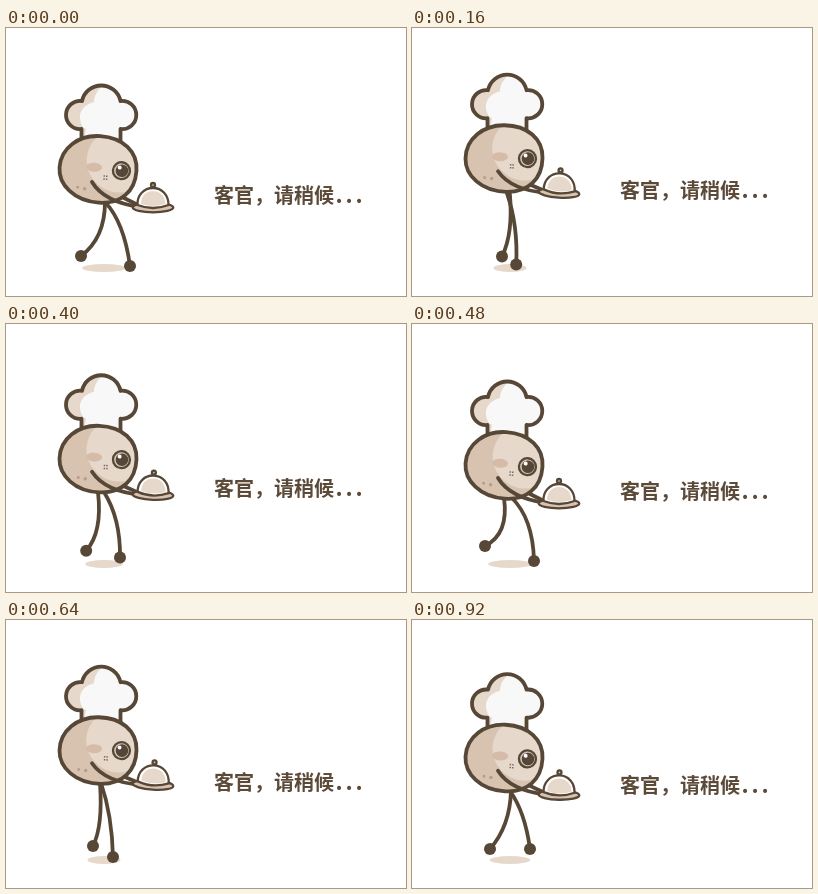
Write an HTML page without scripts that moves like this. It is 400x268 px and loops after 0.96 s.

```html
<!DOCTYPE html>
<html lang="zh-CN">
<head>
<meta charset="utf-8">
<title>请稍候</title>
<style>
  /* 0 = lowest point of the stride, 1 = highest */
  @property --lift { syntax: "<number>"; inherits: true; initial-value: 0; }

  html, body { margin: 0; width: 100%; height: 100%; overflow: hidden; background: #fff; }
  svg {
    --ink: #574737;
    display: block; width: 100vw; height: 100vh;
    animation: bob 480ms -2ms infinite;
  }
  .line { fill: none; stroke: var(--ink); stroke-width: 3.8; stroke-linecap: round; stroke-linejoin: round; }
  .thin { stroke: var(--ink); stroke-width: 2.3; }
  .ink { fill: var(--ink); }
  .tan { fill: #d8c2b0; }
  .sand { fill: #e6d9cb; }

  .hat, .label { transform: translateY(calc(var(--lift) * var(--rise))); }
  .hat { --rise: -14px; }
  .label { --rise: -6px; }
  .head {
    transform-origin: 91px 141px;
    transform: translateY(calc(var(--lift) * -14px)) rotate(calc((1 - var(--lift)) * 4deg));
  }
  .arm {
    transform-origin: 86px 154px;
    transform: translateY(calc(var(--lift) * -14px)) rotate(calc(var(--lift) * -5deg));
  }
  .tray {
    transform-origin: 147px 180px;
    transform: translateY(calc(var(--lift) * -19px)) rotate(calc(var(--lift) * 5deg));
  }
  .shadow { transform-origin: 98px 240px; transform: scaleX(calc(1 - var(--lift) * .32)); }
  .leg { marker-end: url(#foot); animation: 960ms -2ms infinite; }
  .near { animation-name: near; }
  .far { animation-name: far; }
  .label { font: 700 20px "Noto Sans CJK SC", "Noto Sans CJK", sans-serif; fill: #5c4a39; }
  .dots { font-size: 22px; letter-spacing: 2.8px; }

  /* Each step lasts 40 ms */
  @keyframes bob {
    0%       { --lift: 0;   animation-timing-function: steps(2); }
    16.6667% { --lift: .38; animation-timing-function: steps(2); }
    33.3333% { --lift: .77; animation-timing-function: steps(2); }
    50%      { --lift: 1;   animation-timing-function: steps(1); }
    58.3333% { --lift: 1;   animation-timing-function: steps(1); }
    66.6667% { --lift: .86; animation-timing-function: steps(3); }
    91.6667% { --lift: .24; animation-timing-function: steps(1); }
    100%     { --lift: 0; }
  }
  @keyframes near {
    0%       { d: path("M99 174Q118 194 124 238"); animation-timing-function: steps(2); }
    8.3333%  { d: path("M97 169Q113 193 113 238"); animation-timing-function: steps(5); }
    29.1667% { d: path("M92 160Q96 205 91 234");   animation-timing-function: steps(5); }
    50%      { d: path("M92 174Q97 210 73 222");   animation-timing-function: steps(4); }
    66.6667% { d: path("M94 163Q97 206 87 226");   animation-timing-function: steps(4); }
    83.3333% { d: path("M95 162Q104 192 104 229"); animation-timing-function: steps(3); }
    95.8333% { d: path("M98 171Q113 192 118 229"); animation-timing-function: steps(1); }
    100%     { d: path("M99 174Q118 194 124 238"); }
  }
  @keyframes far {
    0%       { d: path("M99 174Q99 210 75 228");   animation-timing-function: steps(2); }
    8.3333%  { d: path("M99 169Q99 212 82 229");   animation-timing-function: steps(5); }
    29.1667% { d: path("M96 160Q105 195 102 228"); animation-timing-function: steps(5); }
    50%      { d: path("M99 173Q121 194 122 237"); animation-timing-function: steps(4); }
    66.6667% { d: path("M95 163Q106 195 107 237"); animation-timing-function: steps(4); }
    83.3333% { d: path("M99 162Q98 205 90 232");   animation-timing-function: steps(3); }
    95.8333% { d: path("M99 171Q98 206 78 229");   animation-timing-function: steps(1); }
    100%     { d: path("M99 174Q99 210 75 228"); }
  }
</style>
</head>
<body>
<svg viewBox="0 0 400 268">
  <defs>
    <path id="hat" d="M75.500 114V101A14.100 14.100 0 1 1 76 73A19.700 19.700 0 0 1 114.500 73A14.100 14.100 0 1 1 114.500 101V114"/>
    <path id="head" d="M92 108C115 108 130.500 121 130.500 140C130.500 161 117 174.500 95 174.500C70 174.500 53.500 159 53.500 142C53.500 122 71 108 92 108Z"/>
    <clipPath id="hatClip"><use href="#hat"/></clipPath>
    <clipPath id="headClip"><use href="#head"/></clipPath>
    <marker id="foot" viewBox="-7 -7 14 14" markerWidth="14" markerHeight="14" markerUnits="userSpaceOnUse">
      <circle class="ink" r="6"/>
    </marker>
  </defs>

  <ellipse class="shadow sand" cx="98" cy="240" rx="22" ry="4"/>
  <path class="line leg far" d="M99 174Q99 210 75 228"/>
  <path class="line leg near" d="M99 174Q118 194 124 238"/>

  <g class="hat">
    <use href="#hat" class="sand"/>
    <path clip-path="url(#hatClip)" fill="#f8f8f9" d="M104 53C94 58 88 66 88 74C79 76 73 83 74 91Q75 99 80 101L77 116H135V53Z"/>
    <use href="#hat" class="line"/>
  </g>

  <path class="arm line" d="M112 167L130 176"/>

  <g class="head">
    <use href="#head" class="tan"/>
    <ellipse clip-path="url(#headClip)" class="sand" cx="113" cy="131" rx="33" ry="32"/>
    <use href="#head" class="line"/>
    <ellipse cx="88" cy="139.500" rx="8" ry="4.500" fill="#d5bba8"/>
    <g fill="#b89d8a">
      <circle cx="73" cy="160.500" r="1.500"/>
      <circle cx="80" cy="161.500" r="1.700"/>
    </g>
    <path d="M98 147.500h4M98 150.500h4" stroke="#806b5b" stroke-width="1.500" stroke-dasharray="1.500 1"/>
    <circle class="thin" cx="115.500" cy="141" r="8.500" fill="#d5c5b5"/>
    <circle cx="116" cy="141" r="6.300" fill="#55463a"/>
    <circle cx="113.500" cy="138" r="2" fill="#fff"/>
  </g>

  <path class="arm line" d="M86 154Q98 174 134 179"/>

  <g class="tray">
    <ellipse class="tan thin" cx="147" cy="179.500" rx="20.300" ry="4.800"/>
    <path class="thin" d="M131.500 177C131 167 138 160 147 160S162.500 167 162.500 177Q147 183 131.500 177Z" fill="#fff"/>
    <path class="sand" d="M135 176C135 168 140 163 147 163S159 168 159.500 176Q147 180 135 176Z"/>
    <circle class="tan thin" cx="147" cy="157" r="2"/>
  </g>

  <text class="label" x="208" y="174.500">客官，请稍候<tspan class="dots" dx="1.500">...</tspan></text>
</svg>
</body>
</html>
```
